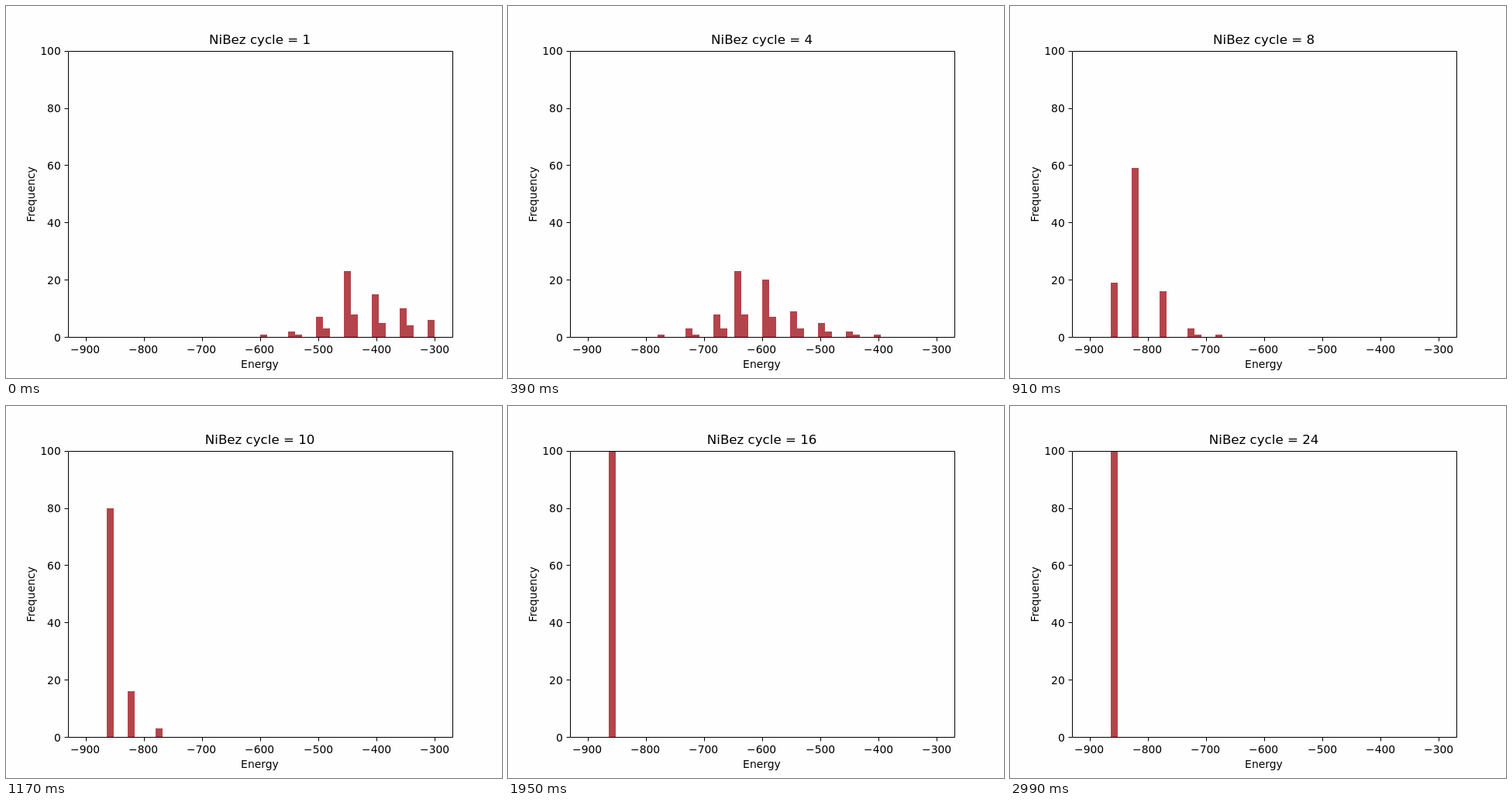
Write an HTML page that moves like this. It is 640 px wide and 480 px high and loops after 3120 ms.

```html
<!DOCTYPE html>
<html lang="en">
<head>
<meta charset="utf-8">
<title>Energy histogram</title>
<style>
  html, body { margin: 0; width: 100%; height: 100%; overflow: hidden; background: #fefefe; }
  svg { display: block; font: 13.89px "DejaVu Sans", sans-serif; }
  #bars { fill: #b4444b; }
  #axes { fill: none; stroke: #000; }
  #title { font-size: 16.67px; }
</style>
</head>
<body>
<svg width="640" height="480" viewBox="0 0 640 480">
  <path id="bars" shape-rendering="crispEdges"/>
  <path id="axes"/>
  <g id="labels" text-anchor="middle">
    <text id="title" x="327.6" y="49"></text>
    <text x="327.4" y="467">Energy</text>
    <text transform="translate(37 243) rotate(-90)">Frequency</text>
  </g>
</svg>
<script>
const CYCLE_MS = 130, CYCLES = 24, SAMPLES = 100;
const BINS = 50, BIN_WIDTH = 12, LEVELS = 17, TICK_LABEL_WIDTH = 38.15;

// The samples gather around a peak energy level and thin out by a constant
// ratio per level below and above it: [cycle, peak, below, above].
const stages = [
  [1, 9, 0.3, 0.65],
  [3, 7, 0.5, 0.55],
  [6, 2, 0.05, 0.33],
  [10, 0, 0.6, 0.2],
  [13, 0, 0, 0.01],
  [14, 0, 0, 0],
  [CYCLES, 0, 0, 0]
];

const byId = id => document.getElementById(id);
const xOf = energy => 80 + (energy + 930) * 496 / 660;
const yOf = count => 427.2 - count * 3.696;
const xPixel = energy => Math.round(xOf(energy));
const yPixel = count => Math.round(yOf(count));

function addLabel(text, x, y, anchor) {
  const label = document.createElementNS("http://www.w3.org/2000/svg", "text");
  label.textContent = text;
  label.setAttribute("x", x);
  label.setAttribute("y", y);
  label.setAttribute("text-anchor", anchor);
  byId("labels").append(label);
}

function drawAxes() {
  let path = "M80.5 58.5H576.5V427.5H80.5Z";
  for (let energy = -900; energy <= -300; energy += 100) {
    path += `M${xPixel(energy) + 0.5} 428v4.5`;
    addLabel("\u2212" + -energy, Math.floor(xOf(energy) - TICK_LABEL_WIDTH / 2), 448, "start");
  }
  for (let count = 0; count <= 100; count += 20) {
    path += `M80 ${yPixel(count) + 0.5}h-4.5`;
    addLabel(count, 70.75, Math.ceil(yOf(count) + 5.28), "end");
  }
  byId("axes").setAttribute("d", path);
}

function stageAt(cycle) {
  const next = Math.max(1, stages.findIndex(stage => stage[0] >= cycle));
  const from = stages[next - 1], to = stages[next];
  const mix = (cycle - from[0]) / (to[0] - from[0]);
  return from.map((value, i) => value + (to[i] - value) * mix);
}

function countsAt(cycle) {
  const [, peak, below, above] = stageAt(cycle);
  const weights = Array.from({ length: LEVELS }, (_, level) =>
    level < peak ? below ** (peak - level) : above ** (level - peak));
  const total = weights.reduce((sum, weight) => sum + weight);
  const counts = Array(BINS + LEVELS).fill(0);
  weights.forEach((weight, level) => {
    const bin = Math.floor(3 + 3.71 * level + 0.012 * level ** 2);
    const count = weight / total * SAMPLES;
    const spill = level > 2 ? count * 0.27 : 0; // higher levels are wider than one bin
    counts[bin] += count - spill;
    counts[bin + 1] += spill;
  });
  return counts.slice(0, BINS).map(Math.round);
}

function drawCycle(cycle) {
  const path = countsAt(cycle).map((count, bin) => {
    if (!count) return "";
    const left = -900 + bin * BIN_WIDTH;
    return `M${xPixel(left)} 427V${yPixel(count)}H${xPixel(left + BIN_WIDTH)}V427Z`;
  });
  byId("bars").setAttribute("d", path.join(""));
  byId("title").textContent = `NiBez cycle = ${cycle}`;
}

let shown = 0;
function tick() {
  const cycle = Math.floor(performance.now() / CYCLE_MS) % CYCLES + 1;
  if (cycle !== shown) drawCycle(shown = cycle);
  requestAnimationFrame(tick);
}

drawAxes();
tick();
</script>
</body>
</html>
```
